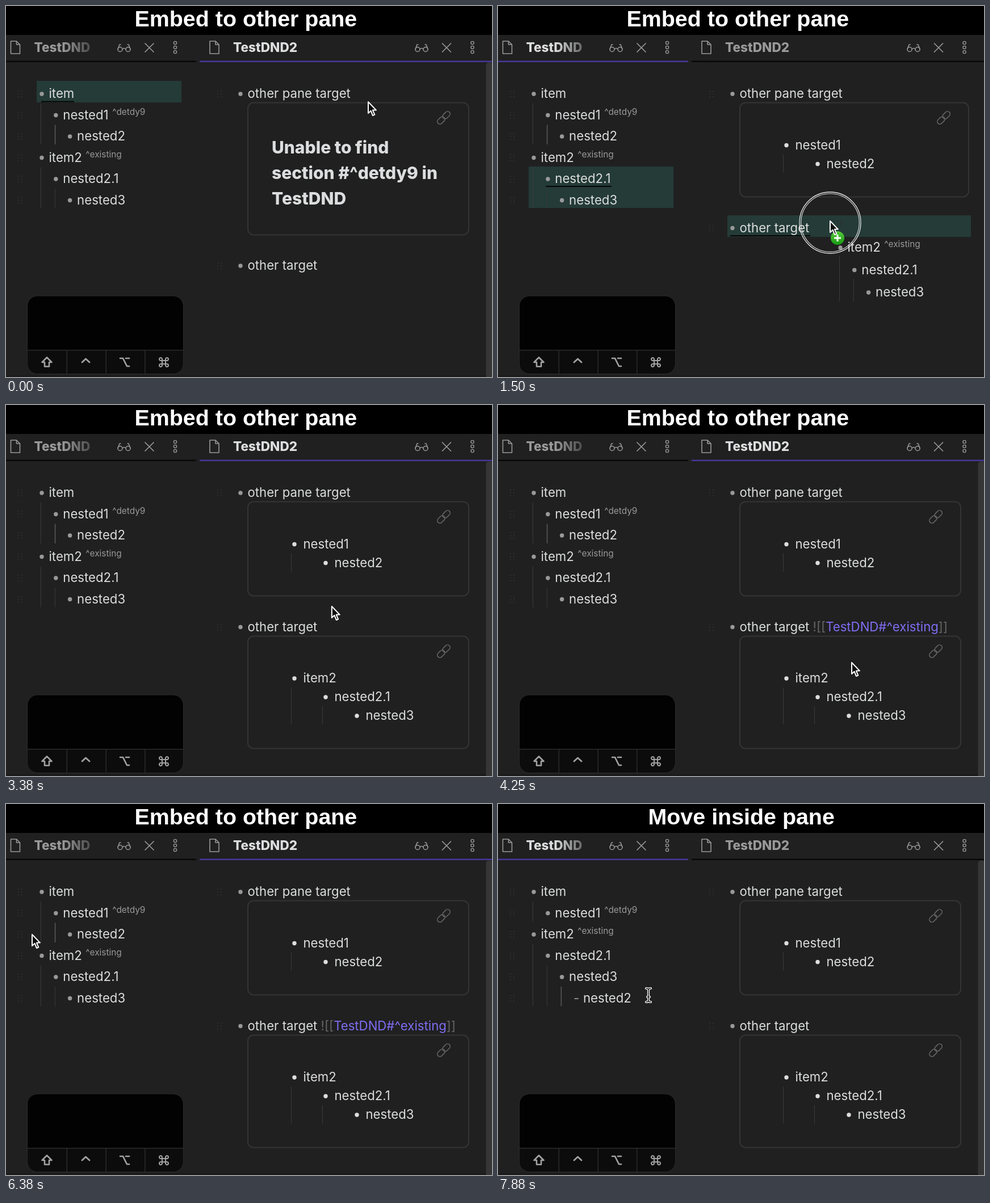
These frames come from a looping animation (856x654 px, 8 s). An HTML page with a canvas:

```html
<!DOCTYPE html>
<html lang="en">
<head>
<meta charset="utf-8">
<title>Drag and drop between panes</title>
<style>
  html, body { margin: 0; width: 100%; height: 100%; overflow: hidden; background: #202020; }
  canvas { display: block; width: 856px; height: 654px; }
</style>
</head>
<body>
<canvas id="stage" width="856" height="654"></canvas>
<script>
const ctx = document.getElementById('stage').getContext('2d');
const LOOP = 8000, STEP = 125;
const BG = '#202020', TEXT = '#dcddde', MUTED = '#999', FAINT = '#666';
const ACCENT = '#483699', LINK = '#7f6df2', TEAL = '#243b37', LINE = '#343434';
const BODY = '22.2px Inter, sans-serif';
const SUP = '15.4px Inter, sans-serif';
const TAB = '800 22.6px Inter, sans-serif';
const HEADING = '800 30px Inter, sans-serif';
const CAPTION = '700 39.4px "Liberation Sans", Arial, sans-serif';

// Moments when the state of the app changes
const GRAB1 = 1000, RESOLVE = 1250, OVER = 1375, DROP1 = 1750, EDIT = 3625;
const HOVER = 4500, LEAVE = 4875, RETITLE = 6625, GRAB2 = 6625, DROP2 = 7125;

// Pointer path: time, x, y, shape from that time on
const path = [
  [0, 637, 168, 'arrow'], [125, 637, 168, 'arrow'], [750, 28, 262, 'hand'],
  [875, 18, 268, 'hand'], [1000, 22, 268, 'drag'], [1250, 170, 302, 'drag'],
  [1500, 584, 378, 'drag'], [1625, 584, 378, 'drag'], [1750, 584, 380, 'arrow'],
  [1875, 586, 376, 'arrow'], [2375, 615, 154, 'beam'], [3000, 615, 154, 'arrow'],
  [3500, 565, 391, 'beam'], [3750, 565, 391, 'arrow'], [4125, 622, 453, 'arrow'],
  [4375, 622, 453, 'arrow'], [4500, 640, 396, 'hand'], [4750, 640, 396, 'arrow'],
  [5000, 612, 440, 'arrow'], [5250, 600, 440, 'arrow'], [6250, 60, 240, 'arrow'],
  [6375, 45, 229, 'arrow'], [6500, 22, 229, 'hand'], [6625, 22, 229, 'drag'],
  [7000, 160, 338, 'drag'], [7125, 160, 338, 'arrow'], [7375, 196, 310, 'beam'],
  [7750, 198, 304, 'beam'], [7875, 265, 337, 'beam'], [8000, 265, 337, 'beam']
];

const item2 = [[0, 'item2', '^existing'], [1, 'nested2.1'], [2, 'nested3']];
const before = [[0, 'item'], [1, 'nested1', '^detdy9', true], [2, 'nested2'], ...item2];
const after = [[0, 'item'], [1, 'nested1', '^detdy9'], item2[0], item2[1],
  [2, 'nested3', '', true], [3, 'nested2', '', false, '-']];

function text(str, x, y, color = TEXT, font = BODY) {
  ctx.font = font;
  ctx.fillStyle = color;
  ctx.fillText(str, x, y);
  return x + ctx.measureText(str).width;
}

function rect(x, y, w, h, color) {
  ctx.fillStyle = color;
  ctx.fillRect(x, y, w, h);
}

function dot(x, y, r, color) {
  ctx.fillStyle = color;
  ctx.beginPath();
  ctx.arc(x, y, r, 0, Math.PI * 2);
  ctx.fill();
}

function ring(x, y, r, color, width) {
  ctx.beginPath();
  ctx.arc(x, y, r, 0, Math.PI * 2);
  stroke(color, width);
}

function stroke(color, width) {
  ctx.strokeStyle = color;
  ctx.lineWidth = width;
  ctx.stroke();
}

function roundBox(x, y, w, h, r) {
  ctx.beginPath();
  ctx.roundRect(x, y, w, h, r);
}

function svg(d, x, y, color, width, fill) {
  const shape = new Path2D(d);
  ctx.save();
  ctx.translate(x, y);
  ctx.lineJoin = ctx.lineCap = 'round';
  if (fill) { ctx.fillStyle = fill; ctx.fill(shape); }
  ctx.strokeStyle = color;
  ctx.lineWidth = width;
  ctx.stroke(shape);
  ctx.restore();
}

function grip(x, y) {
  for (let i = 0; i < 6; i++) rect(x - 4 + i % 2 * 6, y - 5 + (i >> 1) * 5, 2, 2, '#2e2e2e');
}

function list(rows, x, y, { pitch = 37.5, indent = 24.8, gap = 12.5, guide = 1.5,
  top = 19.5, bottom = 15, bullet = MUTED, sups = true } = {}) {
  rows.forEach(([depth, label, sup, bright, dash], i) => {
    const bx = x + depth * indent, ry = y + i * pitch;
    if (dash) text(dash, bx - 4.5, ry + 8, MUTED);
    else dot(bx, ry + 1, 3.7, bullet);
    const end = text(label, bx + gap, ry + 8);
    if (sup && sups) text(sup, end + 6.5, ry, MUTED, SUP);
    let last = i;
    while (rows[last + 1] && rows[last + 1][0] > depth) last++;
    if (last > i) {
      const y1 = ry + pitch - top;
      rect(bx - guide - 0.5, y1, bright ? 1.5 : 1, y + last * pitch + bottom - y1, bright ? '#5a5a5a' : '#3a3a3a');
    }
  });
}

function target(x, y, w, h) { rect(x, y, w, h, TEAL); }
function dropLine(x, y, w) { rect(x, y, w, 2, '#050505'); }

function tab(x, title, active, left, right, icons) {
  svg('M-8-11H2L8-5V11H-8ZM2-11V-5H8', x, 73, MUTED, 1.6);
  const color = active ? TEXT : MUTED;
  let paint = color;
  if (!left) {
    paint = ctx.createLinearGradient(100, 0, 178, 0);
    paint.addColorStop(0, color);
    paint.addColorStop(1, BG);
  }
  text(title, x + 33, 81, paint, TAB);
  const [glasses, cross, menu] = icons;
  svg('M-11 3L-8-5H-6M11 3L8-5H6M-3 3Q0 0 3 3', glasses, 73, MUTED, 1.5);
  ring(glasses - 7, 76.5, 4, MUTED, 1.5);
  ring(glasses + 7, 76.5, 4, MUTED, 1.5);
  svg('M-7.5-7.5L7.5 7.5M7.5-7.5L-7.5 7.5', cross, 73.5, MUTED, 1.7);
  for (const y of [65, 73, 81]) ring(menu, y, 2.6, MUTED, 1.4);
  rect(left, 96.5, right - left, 2.5, active ? ACCENT : '#080808');
}

function chain(x, y) {
  ctx.save();
  ctx.translate(x, y);
  ctx.rotate(-Math.PI / 4);
  for (const dx of [-14, -1]) {
    roundBox(dx, -4.5, 15, 9, 4.5);
    stroke(FAINT, 1.6);
  }
  ctx.restore();
}

function embed(y, right, height) {
  roundBox(426, y, right - 426, height, 10);
  stroke(LINE, 2);
  chain(right - 44, y + 26.5);
}

function embedList(rows, y) {
  list(rows, 508, y, { pitch: 33, indent: 55, gap: 15.5, guide: 5.5, top: 16, bottom: 16, bullet: TEXT, sups: false });
}

function keyPanel() {
  const box = () => roundBox(37.5, 511, 275, 137.5, 18);
  box();
  ctx.fillStyle = '#020202';
  ctx.fill();
  ctx.save();
  ctx.clip();
  rect(37, 606, 276, 43, '#0c0c0c');
  rect(37, 606, 276, 1.5, '#2a2a2a');
  for (const x of [106.5, 175.5, 244]) rect(x, 607, 1.5, 42, '#2a2a2a');
  ctx.restore();
  box();
  stroke('#2b2b2b', 1);
  const key = '#a2a2a2';
  svg('M0-8.5L8.5 0H4V7.5H-4V0H-8.5Z', 72, 628, key, 2.6);
  svg('M-6.5 2L0-4L6.5 2', 140.5, 626, key, 2.9);
  svg('M-8-7H-3L4 7H8M2-7H8', 209, 628, key, 2.7);
  svg('M-3-3H3V3H-3ZM-3-3H-5A2.5 2.5 0 1 1-3-5.5ZM3-3H5A2.5 2.5 0 1 0 3-5.5ZM-3 3H-5A2.5 2.5 0 1 0-3 5.5ZM3 3H5A2.5 2.5 0 1 1 3 5.5Z', 278, 628, key, 2.1);
}

function pointerAt(t) {
  let i = 0;
  while (i < path.length - 2 && path[i + 1][0] <= t) i++;
  const [t0, x0, y0, shape] = path[i], [t1, x1, y1] = path[i + 1];
  const p = (t - t0) / (t1 - t0), e = p * p * (3 - 2 * p);
  return { x: x0 + (x1 - x0) * e, y: y0 + (y1 - y0) * e, shape };
}

function pointer({ x, y, shape }) {
  if (shape === 'beam') {
    const d = 'M-4-12Q0-12 0-9Q0-12 4-12M0-9V9M-4 12Q0 12 0 9Q0 12 4 12M-2 3H2';
    svg(d, x, y, '#fff', 4.2);
    svg(d, x, y, '#161616', 1.5);
  } else if (shape === 'hand') {
    svg('M-3 1Q0-2 2 2L4 8Q6 6 8 8Q10 7 11 9Q14 8 14 12V17Q13 20 12 23H2Q0 19-4 15Q-7 11-3 11L0 13Z', x, y + 1, '#111', 1.4, '#fff');
    svg('M5 14V19M8 14V19M11 14V19', x, y + 1, '#222', 1);
  } else {
    svg('M0 0V20L4.6 15.7L8 24L11.3 22.6L7.9 14.6H14Z', x + 1, y + 1, '#fff', 2, '#0b0b0b');
  }
}

function dragged(p, rows) {
  grip(p.x + 17, p.y + 5);
  list(rows, p.x + 19, p.y + 47, { pitch: 39.5, top: 23, bottom: 17 });
}

function plusBadge({ x, y }) {
  const fill = ctx.createLinearGradient(0, y + 19, 0, y + 43);
  fill.addColorStop(0, '#58c83c');
  fill.addColorStop(1, '#179a12');
  dot(x + 14, y + 31, 12, fill);
  rect(x + 8, y + 29.5, 12, 3, '#fff');
  rect(x + 12.5, y + 25, 3, 12, '#fff');
}

function draw(t) {
  const within = (a, b) => t >= a && t < b;
  const leftActive = within(GRAB1, DROP1) || t >= GRAB2;
  const resolved = t >= RESOLVE, dropped = t >= DROP1;
  const scrollbar = !resolved || dropped;
  const edge = scrollbar ? 815 : 829;
  const secondY = resolved ? 390.5 : 457;

  rect(0, 0, 856, 654, BG);
  rect(0, 0, 856, 51, '#000');
  if (t < RETITLE) text('Embed to other pane', 226.5, 36, '#fff', CAPTION);
  else text('Move inside pane', 264.5, 36, '#fff', CAPTION);

  tab(16.5, 'TestDND', leftActive, 0, 335, [208, 252.5, 298]);
  tab(367, 'TestDND2', !leftActive, 341, 856, [732, 776, 821.5]);
  rect(0, 651, 856, 3, '#1a1a1a');
  if (scrollbar) {
    roundBox(845.5, 99.5, 12, 560, 5);
    ctx.fillStyle = '#363636';
    ctx.fill();
  }

  // Left pane
  if (t < GRAB1) { target(54, 132, 255, 38); dropLine(62, 167.5, 58); }
  if (within(RESOLVE, DROP1)) { target(54, 283, 255, 73); dropLine(84, 317, 116); }
  if (within(6875, DROP2)) { target(54, 323, 255, 38); dropLine(109, 355, 101); }
  for (let i = 0; i < 6; i++) grip(25, 154 + i * 37.5);
  list(t < DROP2 ? before : after, 63, 154);

  // Right pane
  if (within(OVER, DROP1)) { target(404, 369, 429, 38); dropLine(409, 404, 141); }
  grip(376, 154);
  grip(376, secondY);
  list([[0, 'other pane target']], 413, 154);
  list([[0, 'other target']], 413, secondY);
  embed(170.5, edge, resolved ? 166 : 233);
  if (resolved) {
    embedList([[0, 'nested1'], [1, 'nested2']], 244.5);
  } else {
    ['Unable to find', 'section #^detdy9 in', 'TestDND'].forEach((line, i) =>
      text(line, 468, 259.5 + i * 45, TEXT, HEADING));
  }
  if (dropped) {
    embed(407.5, edge, 198);
    embedList(item2, 481);
  }
  if (within(EDIT, GRAB2)) {
    ctx.font = BODY;
    const start = 425.5 + ctx.measureText('other target ').width;
    const open = text('![[', start, secondY + 8, FAINT);
    const close = text('TestDND#^existing', open, secondY + 8, LINK);
    text(']]', close, secondY + 8, FAINT);
    if (within(HOVER, LEAVE)) rect(open, secondY + 11, close - open, 1.5, LINK);
  }

  keyPanel();

  const p = pointerAt(t);
  if (p.shape === 'drag') {
    dragged(p, t < GRAB2 ? item2 : [[0, 'nested2']]);
    ring(p.x + 1, p.y + 4, 54, '#e6e6e6', 1.3);
    ring(p.x + 1, p.y + 4, 51.3, '#e6e6e6', 1.1);
    if (within(OVER, DROP1)) plusBadge(p);
  }
  pointer(p);
}

function frame(now) {
  const t = now % LOOP;
  draw(Math.floor(t / STEP) * STEP);
  requestAnimationFrame(frame);
}
requestAnimationFrame(frame);
</script>
</body>
</html>
```
